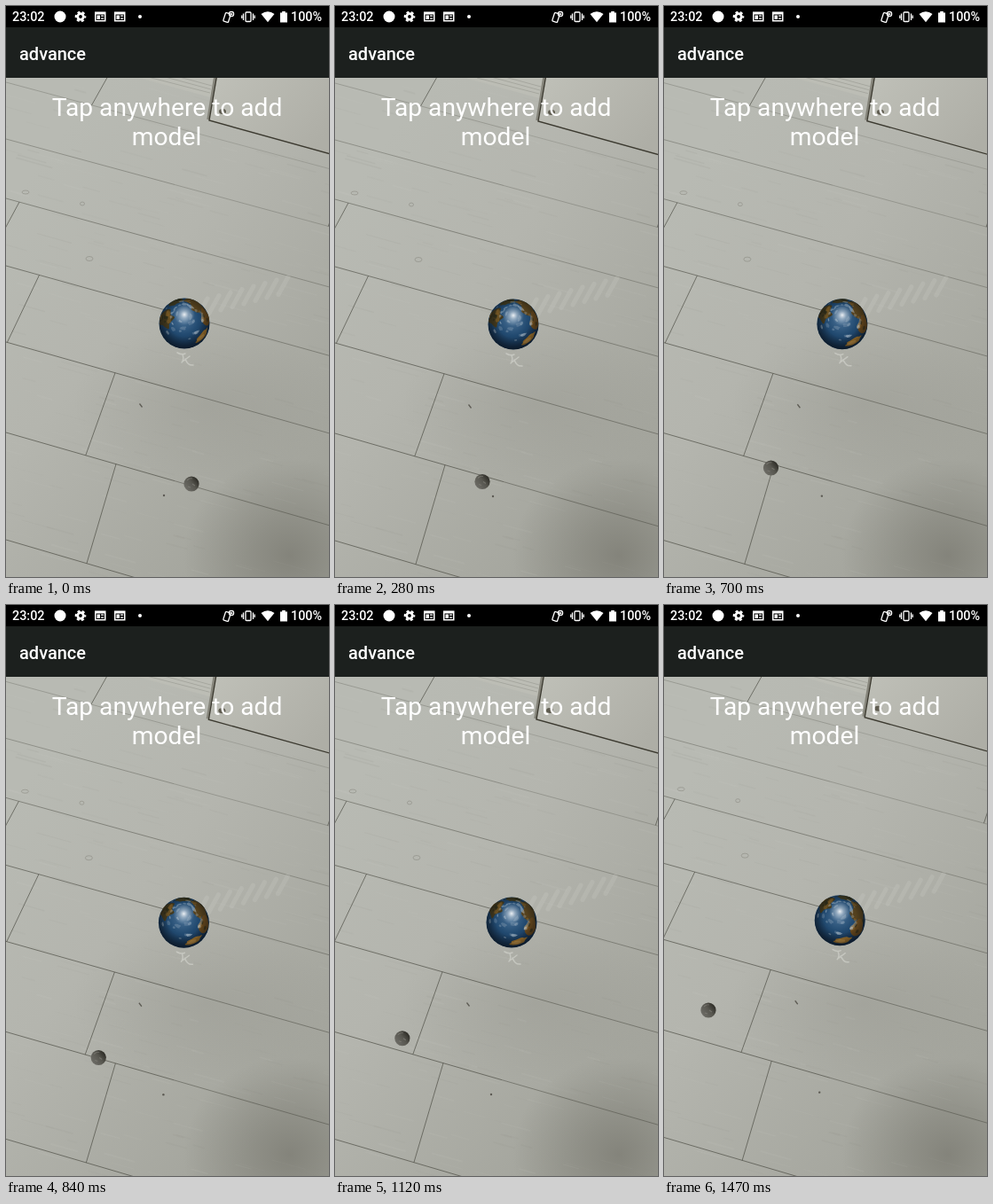
These frames come from a looping animation (364x644 px, 1.54 s). An HTML page:

```html
<!DOCTYPE html>
<html lang="en">
<head>
<meta charset="utf-8">
<title>advance</title>
<style>
html, body { margin: 0; width: 100%; height: 100%; overflow: hidden; background: #000; }
svg { display: block; width: 364px; height: 644px; }
text { font-family: Roboto, sans-serif; fill: #fff; }
</style>
</head>
<body>
<svg viewBox="0 0 364 644" width="364" height="644">
  <defs>
    <linearGradient id="floor" gradientUnits="userSpaceOnUse" x1="20" y1="200" x2="380" y2="480">
      <stop offset="0" stop-color="#b8bab3"/>
      <stop offset=".4" stop-color="#b4b5ae"/>
      <stop offset="1" stop-color="#a3a49c"/>
    </linearGradient>
    <radialGradient id="dark">
      <stop offset="0" stop-color="#6f6e65"/>
      <stop offset="1" stop-color="#6f6e65" stop-opacity="0"/>
    </radialGradient>
    <linearGradient id="door" x1="0" y1="0" x2="1" y2=".6">
      <stop offset="0" stop-color="#c0c1b9"/>
      <stop offset="1" stop-color="#aeaea6"/>
    </linearGradient>
    <radialGradient id="sea" cx=".48" cy=".42" r=".62">
      <stop offset="0" stop-color="#4a7196"/>
      <stop offset=".5" stop-color="#21496f"/>
      <stop offset="1" stop-color="#122a45"/>
    </radialGradient>
    <radialGradient id="shade" cx=".5" cy=".44" r=".58">
      <stop offset=".55" stop-color="#05080d" stop-opacity="0"/>
      <stop offset="1" stop-color="#05080d" stop-opacity=".6"/>
    </radialGradient>
    <radialGradient id="shine">
      <stop offset="0" stop-color="#fff" stop-opacity=".9"/>
      <stop offset=".35" stop-color="#e4ebf1" stop-opacity=".5"/>
      <stop offset="1" stop-color="#c3d0dc" stop-opacity="0"/>
    </radialGradient>
    <linearGradient id="rock" x1=".1" y1=".8" x2=".9" y2=".2">
      <stop offset="0" stop-color="#6d6c66"/>
      <stop offset=".55" stop-color="#57564f"/>
      <stop offset="1" stop-color="#2c2b25"/>
    </linearGradient>
    <clipPath id="disc"><circle r="28.5"/></clipPath>
    <clipPath id="view"><rect y="81" width="364" height="563"/></clipPath>
  </defs>

  <g clip-path="url(#view)">
    <rect y="81" width="364" height="563" fill="url(#floor)"/>
    <ellipse cx="320" cy="620" rx="120" ry="110" fill="url(#dark)" opacity=".6"/>
    <ellipse cx="225" cy="450" rx="150" ry="90" fill="url(#dark)" opacity=".14"/>
    <g id="room">
      <g id="grain" stroke-linecap="round"></g>
      <g id="joints" stroke="#45443c" stroke-width=".9"></g>
      <path d="M135 70H240L234 104L150 81Z" fill="#bcbdb5"/>
      <path d="M160 80l70 18M172 78l59 16M188 78l44 12" stroke="#a6a79f"/>
      <path d="M239 70L229 129L375 169.500V70Z" fill="url(#door)"/>
      <path d="M237 70L227.500 128" stroke="#85847a" stroke-width="2.500"/>
      <path d="M239 70L229 129L375 169.500" stroke="#3c3a30" stroke-width="1.400" fill="none"/>
      <ellipse cx="244" cy="119" rx="4" ry="3" fill="#5f5c50"/>
      <g fill="none" stroke="#8b8a82" opacity=".6">
        <ellipse cx="86" cy="223" rx="2.500" ry="2"/>
        <ellipse cx="94" cy="285" rx="4" ry="2.500"/>
        <ellipse cx="22" cy="210" rx="4" ry="2"/>
      </g>
      <g fill="#5d5b54">
        <circle cx="178" cy="552" r="1.200"/>
        <path d="M151 448l3 4-1 1-3-4z"/>
      </g>
      <g id="feather" stroke="#dbdcd6" stroke-width="5" stroke-linecap="round" opacity=".16"></g>
      <path d="M193 391q5 3 9 1M199 393q2 6-1 9M199 401q4-3 8-6M202 398q3 8 9 7" fill="none" stroke="#d6d7d1" stroke-width="1.500" stroke-linecap="round" opacity=".6"/>
    </g>
    <g id="earth">
      <circle r="28.500" fill="url(#sea)"/>
      <g clip-path="url(#disc)">
        <g id="lands"></g>
        <circle r="28.500" fill="url(#shade)"/>
        <circle cy="-10" r="12" fill="url(#shine)"/>
      </g>
    </g>
    <g id="moon">
      <circle r="8.600" fill="url(#rock)"/>
      <path d="M-5-4q3-3 6-2M-4 3l3 1M1 0l3 2" stroke="#85847d" stroke-width="1.200" opacity=".6" fill="none"/>
    </g>
  </g>

  <rect width="364" height="24"/>
  <rect y="24" width="364" height="57" fill="#1c201e"/>
  <g font-size="14.400" font-weight="500">
    <text x="7" y="17">23:02</text>
    <text x="321" y="17">100%</text>
  </g>
  <g fill="#fff">
    <circle cx="61" cy="12" r="6.500"/>
    <g fill="none" stroke="#fff">
      <circle cx="84" cy="12" r="3.300" stroke-width="2.800"/>
      <circle cx="84" cy="12" r="5.200" stroke-width="2.200" stroke-dasharray="2.9 2.545" stroke-dashoffset="1.450"/>
    </g>
    <g id="news">
      <path d="M100 6.500h12.500v11h-12.500zM101.500 9.500v6.500h9.500v-6.500z" fill-rule="evenodd"/>
      <path d="M102.500 10.500h3.500v4.500h-3.500zM107 10.500h3.200v1.200h-3.200zM107 13.500h3.200v1.200h-3.200z"/>
    </g>
    <use href="#news" x="22"/>
    <circle cx="151" cy="12" r="2"/>
    <g fill="none" stroke="#fff" stroke-width="1.300">
      <rect x="246" y="8" width="6" height="10" rx="1" transform="rotate(18 249 13)"/>
      <circle cx="254" cy="9" r="2.600"/>
      <path d="M254 7.800v1.500h1.200"/>
      <rect x="270" y="7" width="6" height="10.500" rx="1"/>
      <path d="M267.500 8.500v7.500M278.500 8.500v7.500M265.800 10.500v3.500M280.200 10.500v3.500"/>
    </g>
    <path d="M287.500 9Q295 3.500 302.500 9L295 18.300Z"/>
    <path d="M309 7.500h2.200v-1.500h3.600v1.500h2.200v11h-8z"/>
  </g>
  <text x="15" y="61" font-size="20" font-weight="500">advance</text>
  <g font-size="28.200" text-anchor="middle">
    <text x="181.500" y="124">Tap anywhere to add</text>
    <text x="181" y="157">model</text>
  </g>
</svg>
<script>
const LOOP = 1540, STEP = 70, R = 28.5, TILT = 0.33, SLOPE = 0.278;
const $ = id => document.getElementById(id);

function add(parent, tag, attrs) {
  const el = document.createElementNS("http://www.w3.org/2000/svg", tag);
  for (const k in attrs) el.setAttribute(k, attrs[k]);
  return parent.appendChild(el);
}

let seed = 11;
const rnd = (lo = 0, hi = 1) => {
  seed = seed * 16807 % 2147483647;
  return lo + (hi - lo) * seed / 2147483647;
};

// Floor: rows of planks, then joints given as [row, x at the row's top seam].
const rows = [22, 86, 150, 217, 293, 379, 481, 602];
const seamY = (row, x) => rows[row] + x * SLOPE + x * (rows[row] - 290) * 0.00005;
const line = (x1, y1, x2, y2, opacity) => add($("joints"), "line", { x1, y1, x2, y2, opacity });

rows.forEach((y, i) => {
  const o = Math.min(.7, .15 + y / 600);
  line(-10, seamY(i, -10), 190, seamY(i, 190), o);
  line(190, seamY(i, 190), 380, seamY(i, 380), o * .75);
});
for (const [row, x] of [[0, 128], [1, 383], [3, 15], [4, 37.5], [5, 123], [6, 124]]) {
  const y = seamY(row, x), lean = .68 - y * .0006 - x * .0006;
  const end = x - lean * (rows[row + 1] - rows[row]) / (1 + SLOPE * lean);
  line(x, y, end, seamY(row + 1, end), .7);
}

for (let i = 0; i < 320; i++) {
  const x = rnd(-20, 360), y = rnd(70, 640), len = rnd(8, 40);
  add($("grain"), "line", {
    x1: x, y1: y, x2: x + len, y2: y + len * SLOPE,
    stroke: rnd() < .5 ? "#d0d1cb" : "#86857d",
    "stroke-width": rnd(.5, 2), opacity: rnd(.03, .1)
  });
}
for (let i = 0; i < 8; i++) {
  const x = 216 + i * 13, y = 350 - i * 3.5;
  add($("feather"), "line", { x1: x, y1: y, x2: x + 11, y2: y - 20 });
}

// Globe: ragged blobs placed by longitude and distance from the pole, in degrees.
const blobs = [];
function blob(fill, opacity, lon, dist, size, wide = 1) {
  const pts = [];
  for (let i = 0; i < 14; i++) {
    const a = i * Math.PI / 7, r = size * rnd(.65, 1.25);
    const d = Math.max(4, dist + r * Math.sin(a));
    pts.push([lon + wide * r * Math.cos(a) / Math.sin(dist * Math.PI / 180), d]);
  }
  blobs.push({ el: add($("lands"), "path", { fill, opacity }), pts });
}

blob("#43391d", 1, 180, 50, 25);
blob("#3d3920", 1, 245, 52, 18);
blob("#54411e", 1, 308, 50, 26);
blob("#6a4a1d", 1, 350, 62, 22);
blob("#a8782c", 1, 42, 73, 13, 1.7);
blob("#cf9c4a", .8, 46, 74, 7, 2);
for (let i = 0; i < 24; i++)
  blob(i % 2 ? "#8a6428" : "#242717", .55, rnd(160, 375), rnd(30, 80), rnd(3, 8));
for (let i = 0; i < 26; i++)
  blob("#c3ced6", rnd(.2, .5), rnd(0, 360), rnd(15, 62), rnd(2, 5), rnd(1, 2.5));

function project(lon, dist) {
  const s = Math.sin(dist), x = s * Math.cos(lon), v = s * Math.sin(lon), w = Math.cos(dist);
  const y = v * Math.cos(TILT) - w * Math.sin(TILT);
  const z = v * Math.sin(TILT) + w * Math.cos(TILT);
  const k = z < 0 ? R * 1.05 / Math.hypot(x, y) : R;
  return [x * k, y * k];
}

function smooth(pts) {
  const mid = (a, b) => [(a[0] + b[0]) / 2, (a[1] + b[1]) / 2];
  const f = p => p.map(n => n.toFixed(2)).join(" ");
  let d = "M" + f(mid(pts[pts.length - 1], pts[0]));
  pts.forEach((p, i) => d += `Q${f(p)} ${f(mid(p, pts[(i + 1) % pts.length]))}`);
  return d + "Z";
}

const ease = (t, a, b) => {
  const u = Math.min(1, Math.max(0, (t - a) / (b - a)));
  return u * u * (3 - 2 * u);
};

// Moon path as [time, x, y].
const orbit = [[0, 209, 539], [140, 185, 540.5], [420, 147, 532.5], [700, 120.5, 521],
  [980, 88, 500], [1260, 63.7, 477.5], [1470, 50, 457]];

function moonAt(t) {
  const i = Math.max(1, orbit.findIndex(p => p[0] >= t));
  const a = orbit[i - 1], b = orbit[i], u = (t - a[0]) / (b[0] - a[0]);
  return [a[1] + (b[1] - a[1]) * u, a[2] + (b[2] - a[2]) * u];
}

const move = (id, x, y) => $(id).setAttribute("transform", `translate(${x.toFixed(2)} ${y.toFixed(2)})`);

function draw(t) {
  const cx = -2.8 * ease(t, 600, 1400);
  const cy = ease(t, 0, 140) - ease(t, 500, 1000) - 2.4 * ease(t, 1200, 1500);
  move("room", cx, cy);
  move("earth", 201 + cx, 358 + cy);
  move("moon", ...moonAt(t));
  const spin = 42 * t / 1470, rad = Math.PI / 180;
  for (const { el, pts } of blobs)
    el.setAttribute("d", smooth(pts.map(([lon, dist]) => project((lon + spin) * rad, dist * rad))));
}

const start = performance.now();
function tick() {
  const t = (performance.now() - start) % LOOP;
  draw(Math.floor(t / STEP) * STEP);
  requestAnimationFrame(tick);
}
tick();
</script>
</body>
</html>
```
